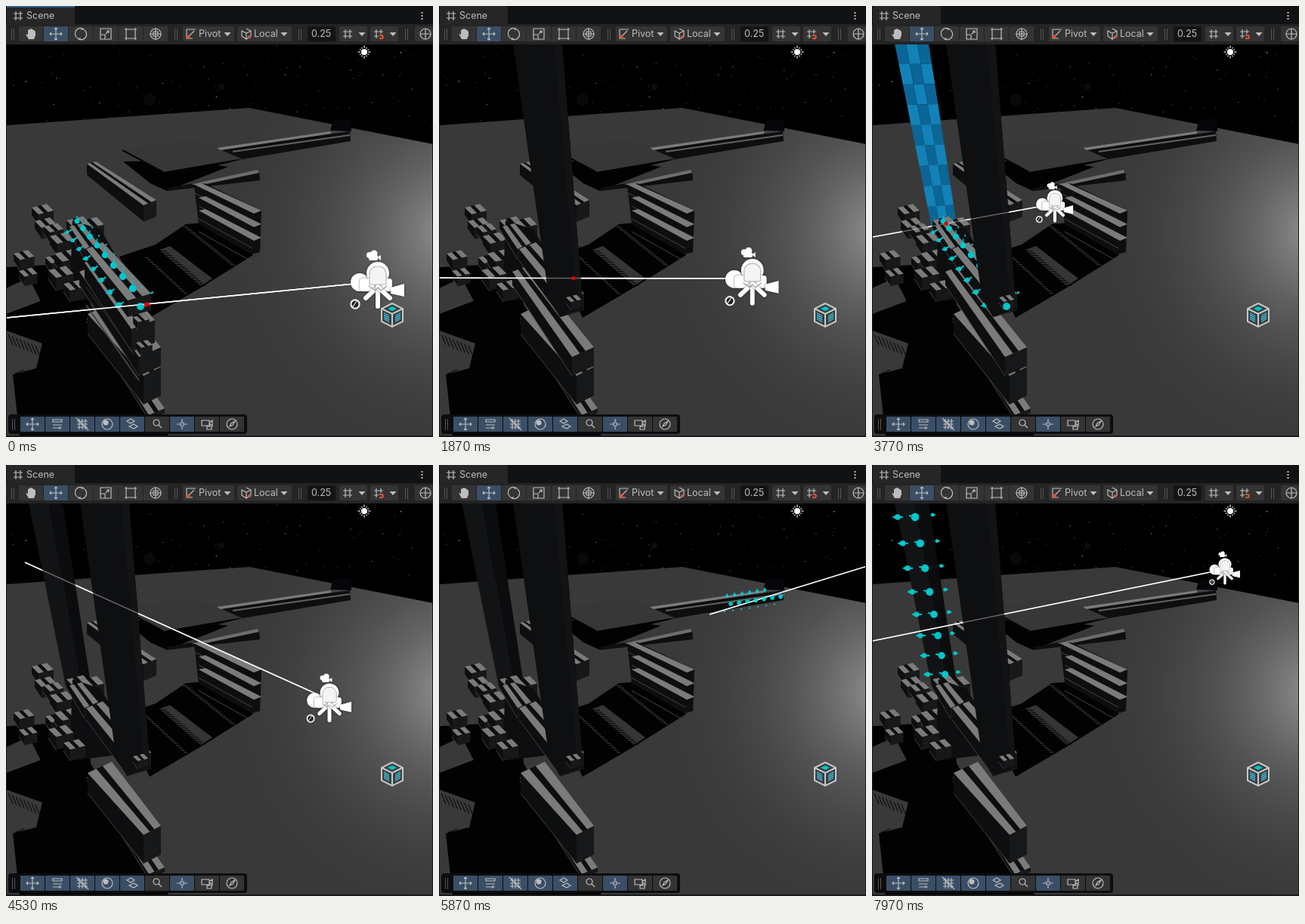
These frames come from a looping animation (565 px wide and 571 px high, 8000 ms). An HTML page with a canvas:

```html
<!DOCTYPE html>
<html lang="en">
<head>
<meta charset="utf-8">
<style>
html, body { margin: 0; width: 100%; height: 100%; overflow: hidden; background: #111; }
canvas { display: block; }
</style>
</head>
<body>
<canvas id="stage" width="565" height="571"></canvas>
<script>
const g = document.getElementById('stage').getContext('2d');
const LIGHT = '#7b7b7b', DARK = '#0d0e10', END = '#17181a', SHADE = '#020202';
const CYAN = '#00c6ca', RED = '#e60000', INK = '#bdbdbd', BUTTON = '#343434', ACTIVE = '#3a4e66';

// ---------- helpers ----------
function trace(p) {
  g.beginPath();
  for (let i = 0; i < p.length; i += 2) g.lineTo(p[i], p[i + 1]);
}
function poly(color, ...p) {
  trace(p);
  g.fillStyle = color;
  g.fill();
}
function line(color, width, ...p) {
  trace(p);
  g.strokeStyle = color;
  g.lineWidth = width;
  g.stroke();
}
function dot(color, x, y, r) {
  g.beginPath();
  g.arc(x, y, r, 0, 7);
  g.fillStyle = color;
  g.fill();
}
function rect(color, x, y, w, h, r = 0) {
  g.beginPath();
  g.roundRect(x, y, w, h, r);
  g.fillStyle = color;
  g.fill();
}
const mix = (a, b, k) => a + (b - a) * k;
// Quads list far-left, far-right, near-right, near-left.
function at([ax, ay, bx, by, cx, cy, dx, dy], u, v) {
  return [mix(mix(ax, bx, u), mix(dx, cx, u), v), mix(mix(ay, by, u), mix(dy, cy, u), v)];
}
function patch(color, q, u0, u1, v0 = 0, v1 = 1) {
  poly(color, ...at(q, u0, v0), ...at(q, u1, v0), ...at(q, u1, v1), ...at(q, u0, v1));
}
function checker(q, cols, rows) {
  for (let i = 0; i < cols; i++)
    for (let j = 0; j < rows; j++)
      patch((i + j) % 2 ? '#1282b8' : '#0b6596', q, i / cols, (i + 1) / cols, j / rows, (j + 1) / rows);
}
function beam(q, h, blue) {
  const [ax, ay, , , cx, cy, dx, dy] = q;
  poly(blue ? '#0a5a88' : DARK, ax, ay, dx, dy, dx, dy + h, ax, ay + h * .7);
  poly(blue ? '#0e6fa3' : END, dx, dy, cx, cy, cx, cy + h, dx, dy + h);
  if (blue) {
    checker(q, 2, 9);
    line('#1695cf', 1, ax, ay, dx, dy, cx, cy, cx, cy + h, dx, dy + h, dx, dy);
    return;
  }
  line('#3f3f3f', 1, ax, ay + h * .7, dx, dy + h);
  patch(DARK, q, 0, 1);
  patch(LIGHT, q, 0, .36);
  patch(LIGHT, q, .62, 1);
}
function block(x, y, w) {
  const l = w * .45, h = w * .75, r = w / 4;
  beam([x, y, x + w, y - r, x + l + w, y + l - r, x + l, y + l], h);
}
function comb(color, x0, y0, x1, y1, n, dx, dy) {
  for (let i = 0; i < n; i++) {
    const x = mix(x0, x1, i / n), y = mix(y0, y1, i / n);
    line(color, 1, x, y, x + dx, y + dy);
  }
}

// ---------- motion: each move is start, end, then the values reached ----------
const CAMERA = [
  [30, 830, 394, 357, .98], [1670, 2270, 473, 372, 1.03], [3000, 3770, 242, 262, .69],
  [4130, 4530, 428, 311, .83], [4570, 4930, 458, 180, .62], [4970, 5770, 622, 117, .6],
  [7130, 7930, 467, 138, .57]
];
const RAY = [
  [30, 830, 1, 440], [870, 1230, 1, 503], [1270, 1450, 1, 560], [1450, 1670, 1, 320],
  [1700, 2270, 1, 506], [2430, 2570, 1, 537], [3000, 3770, 1, 306], [4130, 4530, 25, 129],
  [4570, 4930, 212, 215], [4970, 5770, 358, 198], [5900, 6430, 290, 238],
  [6670, 6930, 340, 205], [7130, 7970, 1, 233]
];
function follow(moves, start, t) {
  return moves.reduce((p, [a, b, ...to]) => {
    const k = Math.min(1, Math.max(0, (t - a) / (b - a)));
    return p.map((v, i) => mix(v, to[i], k * k * (3 - 2 * k)));
  }, start);
}

// ---------- scenery ----------
let seed = 11;
const rnd = () => (seed = seed * 16807 % 2147483647) / 2147483647;
const stars = Array.from({ length: 120 }, () => [rnd() * 565, 51 + rnd() * 108, 35 + rnd() * rnd() * 130, .4 + rnd() * .5]);
const glow = g.createRadialGradient(595, 300, 10, 595, 300, 340);
for (let k = 0; k <= 1; k += .125) {
  const c = 57 + 89 * (1 - k) ** 2.6;
  glow.addColorStop(k, `rgb(${c},${c},${c})`);
}

function sky() {
  rect('#000', 1, 50, 563, 519);
  for (const [x, y, c, r] of stars) dot(`rgb(${c},${c},${c})`, x, y, r);
  dot('#090909', 190, 124, 8);
  dot('#0c0c0c', 285, 107, 4);
  poly(glow, 0, 158, 322, 135, 565, 183, 565, 571, 0, 571);
}
function shadows() {
  poly(SHADE, 0, 346, 110, 340, 112, 400, 48, 395, 30, 360, 0, 374);
  poly(SHADE, 0, 408, 48, 390, 110, 392, 216, 571, 18, 571, 9, 488, 40, 480, 48, 447, 0, 430);
  comb(SHADE, 3, 435, 44, 452, 8, 6, 14);
  comb(SHADE, 12, 487, 24, 569, 20, 12, -5);
  poly(SHADE, 150, 332, 198, 316, 238, 289, 263, 287, 327, 330, 258, 373, 190, 413);
  poly('#353535', 203, 323, 217, 318, 273, 361, 258, 371);
  comb(SHADE, 205, 324, 260, 372, 16, 8, 1);
  comb('#444', 184, 333, 238, 383, 17, 5, 1);
  comb('#3a3a3a', 234, 292, 300, 345, 20, 7, 1);
}
function distant() {
  poly(SHADE, 155, 206, 313, 203, 280, 211, 294, 213, 213, 245, 191, 235);
  poly('#373737', 154, 191, 240, 177, 285, 188, 313, 202, 208, 220);
  line('#050505', 2, 154, 191, 208, 220);
  poly(DARK, 283, 190, 455, 166, 456, 179, 313, 203);
  poly(LIGHT, 279, 188, 430, 166, 430, 169, 284, 191);
  line('#606060', 2, 300, 193, 455, 171);
  poly('#05050a', 429, 165, 433, 152, 447, 149, 457, 152, 457, 166);
  poly(DARK, 213, 241, 335, 219, 336, 231, 214, 245);
  poly('#6d6d6d', 245, 236, 333, 217, 335, 221, 255, 238);
  beam([107, 209, 119, 206, 199, 257, 182, 264], 22);
  // stacked planks
  poly(DARK, 249, 238, 263, 235, 338, 271, 336, 326, 325, 329, 255, 289);
  for (let i = 0; i < 4; i++) {
    const x = i ? 255 : 250, y = 237 + i * 17, r = 271 + i * 18;
    if (i < 3) poly(LIGHT, x, y, x + 9, y - 2, 338, r, 328, r + 4);
    line('#454545', 1, x, y + 11, 326, r + 14);
  }
}
function debris() {
  for (const [x, y, w] of [[34, 267, 20], [38, 285, 20], [80, 284, 22], [98, 285, 22], [10, 328, 19],
    [17, 351, 17], [50, 292, 18], [58, 305, 22], [52, 333, 18], [64, 328, 24]]) block(x, y, w);
  poly(DARK, 88, 284, 125, 296, 145, 330, 140, 385, 84, 392);
  beam([84, 292, 100, 288, 122, 314, 104, 322], 14);
  block(56, 350, 23);
  block(76, 368, 20);
}
function wall(t) {
  beam([107, 414, 122, 408, 210, 533, 189, 542], 6);
  beam([108, 408, 140, 393, 205, 478, 182, 490], 38);
  if (t < 3900) beam([97, 352, 118, 344, 205, 452, 176, 465], 25, t >= 2800 && t < 3400);
  if (t < 1850) beam([104, 340, 124, 332, 197, 416, 166, 428], 30, t >= 1300 && t < 1430);
  beam([106, 322, 128, 313, 192, 381, 161, 390], 22);
  if (t < 1850) {
    block(168, 412, 15);
    block(172, 446, 15);
    line('#333', 1, 106, 372, 170, 462);
    line('#444', 2, 106, 396, 176, 496);
  }
}
function pillarBack(blue) {
  const q = [30, 50, 75, 50, 112, 290, 79, 293];
  if (blue) return checker(q, 3, 9);
  patch('#121315', q, 0, .6);
  patch('#0b0c0e', q, .6, 1);
}
function pillarFront(blue) {
  const q = [98, 50, 163, 50, 191, 403, 146, 390];
  if (blue) return checker(q, 3, 9);
  patch('#0e0f11', q, 0, 1);
  patch('#121315', q, .83, 1);
  poly('#0e0f11', 144, 385, 191, 400, 160, 412);
  block(168, 386, 14);
}

// ---------- face arrows ----------
function cone(x, y, dx, dy, s) {
  poly(CYAN, x + dx * s * 1.6, y + dy * s * 1.6, x - dy * s * .8, y + dx * s * .8, x + dy * s * .8, y - dx * s * .8);
  dot(CYAN, x, y, s * .8);
}
function nearBall() {
  dot(CYAN, 178, 398, 5);
  cone(193, 380, .7, -.7, 2);
}
function topArrows() {
  for (let i = 0; i < 8; i++) {
    const a = i * (1 + i * .055), s = 3 + i * .22;
    const x = 94 + a * 7.6, y = 285 + a * 9.2, lx = 81 + a * 7.1, ly = 300 + a * 9.9;
    line(CYAN, 1.5, x, y, x, y - s * 2.4);
    dot(CYAN, x, y, s + .5);
    cone(lx, ly, -.9, .2, s);
    line(CYAN, 2, lx, ly, lx + 6, ly - 4);
    cone(x + 12, y - 1, .7, -.7, 1.3);
  }
}
function wallArrows() {
  for (let i = 0; i < 7; i++) {
    const x = 386 + i * 11, y = 184 - i * 1.6;
    if (i < 6) cone(x - 5 - i, y - 10, 0, -1, 2.6);
    dot(CYAN, x, y, 2.8);
    line(CYAN, 1, x, y, x + 5, y - 3);
    cone(x - 8, y + 10, -.3, .9, 1.2);
  }
}
function pillarArrows() {
  line(CYAN, 2, 45, 50, 55, 50);
  for (let i = 0; i < 8; i++) {
    const y = 69 + i * 35.5 - i * i * .82, x = 57 + i * 7 - i * i * .19, s = 5.4 - i * .12;
    dot(CYAN, x, y, s);
    line(CYAN, 2, x - 8, y - 2, x, y);
    cone(x - 23, y, -1, 0, s - .6);
    line(CYAN, 2, x - 23, y, x - 16, y);
    cone(x + 23 - i * .9, y - 3, 1, 0, 3);
  }
}

// ---------- gizmos ----------
function cameraIcon(x, y, s) {
  const w = '#fff';
  g.save();
  g.translate(x, y);
  g.scale(s, s);
  g.lineCap = 'round';
  g.shadowColor = '#0008';
  g.shadowBlur = 3;
  dot(w, -24, 1, 12);
  dot(w, 0, -11, 15);
  rect(w, -24, -4, 43, 17, 4);
  poly(w, 17, 8, 35, 3, 35, 20, 17, 16);
  for (const dx of [-16, 0, 16]) line(w, 6, 0, 7, dx, dx ? 22 : 33);
  g.shadowBlur = 0;
  rect('#f4f4f4', -11, -20, 22, 24, [10, 10, 2, 2]);
  g.strokeStyle = '#b5b5b5';
  g.lineWidth = 1.2;
  g.stroke();
  line('#999', 1.2, -12, 6, -3, 12, 0, 8, 4, 12, 12, 6);
  // small movie camera
  dot(w, -11, -35, 4);
  dot(w, -5, -37, 4.5);
  rect(w, -12, -35, 12, 7, 2);
  poly(w, -1, -32, 4, -35, 4, -28);
  // shutter
  dot('#222', -30, 30, 5.6);
  g.setLineDash([4.6, 1.2]);
  g.strokeStyle = '#eee';
  g.lineWidth = 2.2;
  g.stroke();
  g.setLineDash([]);
  line('#eee', 1.2, -33, 33, -28, 26);
  g.restore();
}
function sun() {
  dot('#fff', 474, 61, 4);
  for (let i = 0; i < 12; i++) {
    const a = i * Math.PI / 6, c = Math.cos(a), s = Math.sin(a), r = i % 3 ? 7 : 8.5;
    line('#ddd', 1.3, 474 + c * 5.2, 61 + s * 5.2, 474 + c * r, 61 + s * r);
  }
}
function probe() {
  const c = '#c9c9c9', hex = [0, -15, 14, -8, 14, 9, 0, 16, -14, 9, -14, -8, 0, -15];
  g.save();
  g.translate(511, 409);
  poly('#3a3f42', ...hex);
  poly(CYAN, 0, -11, 6, -8, 0, -5, -6, -8);
  for (const s of [-1, 1]) {
    poly('#3fc0dc', s * 11, -3, s * 4, 1, s * 4, 10, s * 11, 6);
    comb('#3a3f42', s * 11, -1, s * 11, 7, 3, s * -8, 4);
  }
  line(c, 2, ...hex);
  line(c, 2, -14, -8, 0, -1, 14, -8);
  line(c, 2, 0, -1, 0, 16);
  g.restore();
}
function hits(t, x0, y0, x1, y1) {
  const xs = t < 870 ? [187] : t < 2270 ? [178] : t < 3000 ? [190, 166, 35] : t > 3600 && t < 4130 ? [98] : [];
  for (const x of xs) dot(RED, x, mix(y0, y1, (x - x0) / (x1 - x0)), 2.6);
  if (t < 870) poly(RED, 183, 393, 193, 396, 183, 399);
}

// ---------- toolbars ----------
const CIRCLE = 'M-7 0A7 7 0 1 1 7 0A7 7 0 1 1-7 0';
const ICONS = {
  hand: 'M-3 7L-7 0L-4 1V-5L0-7L4-5L6-3V2L4 7Z',
  move: 'M-8 0H8M0-8V8M-6-2L-8 0L-6 2M6-2L8 0L6 2M-2-6L0-8L2-6M-2 6L0 8L2 6',
  rotate: 'M-5 5A7 7 0 0 1 4-6H0M5-5A7 7 0 0 1-4 6H0',
  scale: 'M-7-7H7V7H-7ZM-7 1H-1V7M0 0L4-4H1M4-4V-1',
  rect: 'M-6-8V8M6-8V8M-8-6H8M-8 6H8',
  orbit: CIRCLE + 'M-8 0H8M0-8V8M-3-3H3V3H-3Z',
  grid: 'M-6-3H6M-6 3H6M-3-6V6M3-6V6',
  rows: 'M-6-6H6V-3H-6ZM-6 1H6M-6 5H6M3 3V7',
  hatch: 'M-7-4H7M-7 0H7M-7 4H7M-4-7V7M0-7V7M4-7V7M-8-8L8 8',
  sphere: CIRCLE,
  layer: 'M-7-4L-2-7L3-4L-2-1ZM-4 3L2 0L7 3L2 6Z',
  search: 'M-5-2A4 4 0 1 1 3-2A4 4 0 1 1-5-2M2 1L6 5',
  pad: 'M-7 0H-3M3 0H7M0-7V-3M0 3V7M-2-2H2V2H-2Z',
  cam: 'M-7-5H3V2H-7ZM3-2L7-5V2L3-1M0 3H6V7H0Z',
  compass: CIRCLE + 'M-3 3L-1-1L4-4L1 1Z',
  globe: CIRCLE + 'M-7 0H7M0-7V7',
  pivot: 'M6-6H-6V6H2M-4 4L4-4',
  cube: 'M0-7L6-4V3L0 7L-6 3V-4L0-1L6-4M0-1V7'
};
function icon(name, x, y) {
  g.save();
  g.translate(x, y);
  const p = new Path2D(ICONS[name]);
  g.strokeStyle = g.fillStyle = INK;
  g.lineWidth = 1.2;
  name === 'hand' ? g.fill(p) : g.stroke(p);
  g.restore();
}
function text(s, x, y) {
  g.font = '12.5px Inter, sans-serif';
  g.textBaseline = 'middle';
  g.fillStyle = INK;
  g.fillText(s, x, y);
}
function grip(x, y) {
  for (const dx of [-1.5, 1.5]) line('#555', 1, x + dx, y - 7, x + dx, y + 8);
}
const caret = x => poly(INK, x - 4.5, 35, x + 4.5, 35, x, 40);
// A star marks an active button.
function buttons(names, x, y) {
  names.split(' ').forEach((n, i) => {
    rect(n.endsWith('*') ? ACTIVE : BUTTON, x + i * 33, y, 32, 20, 1);
    icon(n.replace('*', ''), x + 16 + i * 33, y + 10);
  });
}
function chrome(t) {
  rect('#111214', 0, 0, 565, 25);
  rect('#262626', 1, 0, 90, 25, 3);
  if (t < 30) rect('#2c5d87', 1, 0, 90, 2);
  icon('grid', 16, 13);
  text('Scene', 27, 13);
  for (const y of [8, 12, 16]) rect(INK, 549.5, y, 2, 2);
  rect('#242424', 0, 24, 565, 27);
  buttons('hand move* rotate scale rect orbit', 17, 27);
  for (const x of [9, 225, 389, 530]) grip(x, 37);
  for (const [x, w] of [[234, 68], [306, 72], [441, 37], [482, 37], [541, 24]]) rect(BUTTON, x, 27, w, 20, 2);
  icon('pivot', 245, 37);
  dot('#d9583b', 241, 41, 2.5);
  text('Pivot', 255, 37.5);
  icon('cube', 318, 37);
  dot('#d9583b', 322, 41, 2);
  text('Local', 328, 37.5);
  rect('#141414', 399, 27, 37, 20, 2);
  text('0.25', 404, 37.5);
  icon('grid', 452, 37);
  icon('grid', 493, 37);
  rect(BUTTON, 493, 37, 9, 9);
  line('#e0532f', 2, 494, 39, 498, 39, 499, 41, 498, 43, 494, 43);
  [293, 368, 471, 512].forEach(caret);
  icon('globe', 555, 37);
  rect('#0c0d0e', 3, 541, 316, 26, 4);
  grip(10, 554);
  buttons('move* rows* hatch* sphere* layer* search pad* cam compass', 19, 544);
  dot(INK, 132, 552, 3.5);
}

function draw(t) {
  const [cx, cy, size] = follow(CAMERA, [492, 365, 1], t);
  const [ex, ey] = follow(RAY, [1, 413], t);
  const ray = () => line('#fff', 1.5, cx, cy, ex, ey);
  const arrowsOn = t < 400 || (t >= 3550 && t < 4130);
  rect('#1a1a1a', 0, 0, 565, 571);
  g.save();
  g.beginPath();
  g.rect(1, 50, 563, 519);
  g.clip();
  sky();
  shadows();
  distant();
  if (t < 7000) ray();
  if (t >= 3400) pillarBack(t < 3900);
  debris();
  wall(t);
  if (arrowsOn) topArrows();
  if (t >= 5700 && t < 7130) wallArrows();
  if (t >= 7600) pillarArrows();
  if (t >= 7000 || t < 3400) ray();
  if (t >= 1430) pillarFront(t < 1850);
  if (arrowsOn) nearBall();
  g.globalAlpha = .35;
  ray();
  g.globalAlpha = 1;
  hits(t, cx, cy, ex, ey);
  cameraIcon(cx, cy, size);
  sun();
  probe();
  g.restore();
  chrome(t);
}
function tick() {
  draw(performance.now() % 8000);
  requestAnimationFrame(tick);
}
tick();
</script>
</body>
</html>
```
